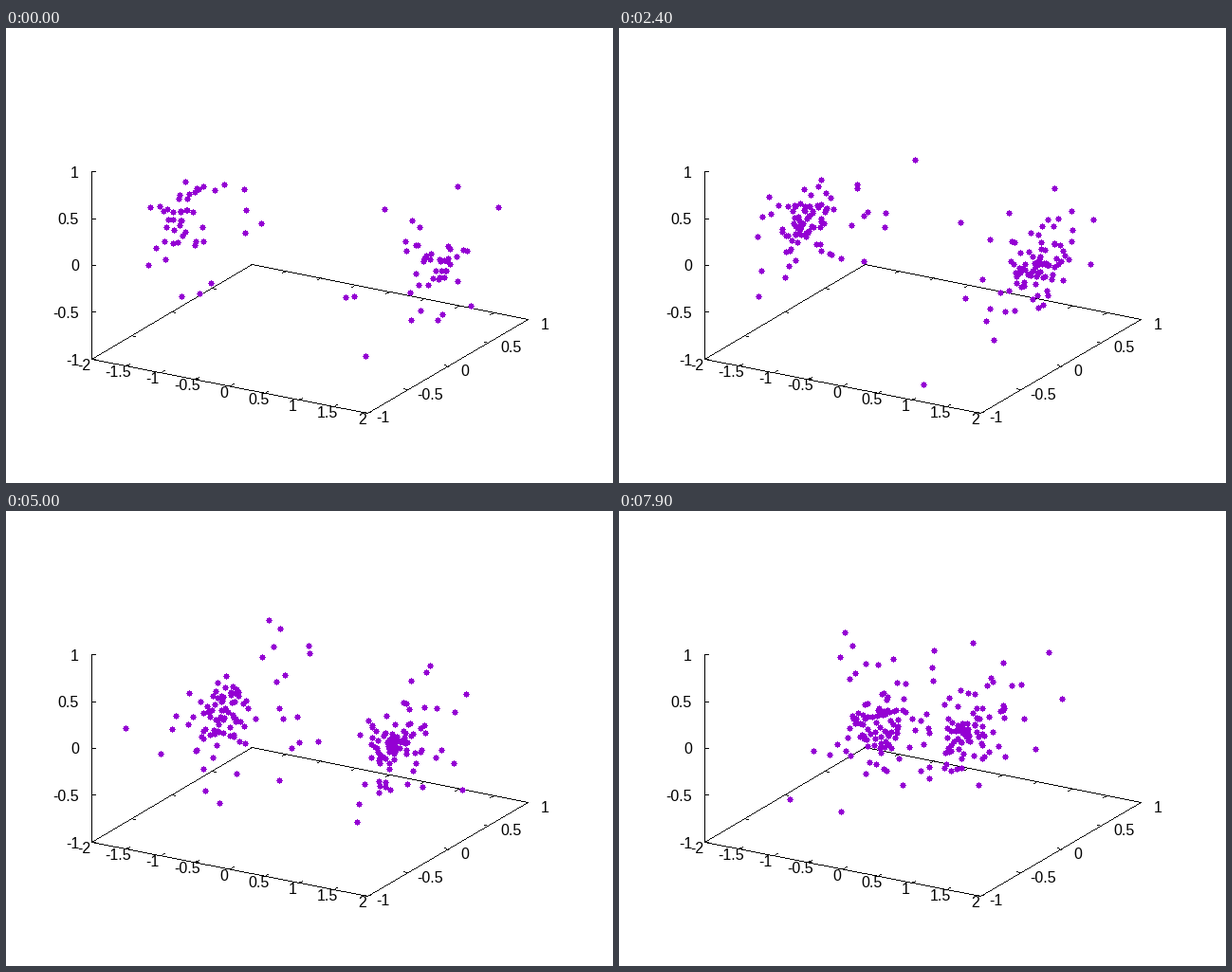
Recreate the animation shown at these times as a matplotlib script. Size 640x480 px, loop 8000 ms.

```python
import numpy as np
import matplotlib.pyplot as plt
from matplotlib.animation import FuncAnimation

W, H, DPI = 640, 480, 80
FRAMES, STEP = 80, 0.1      # 80 frames of 100 ms
PX = 72 / DPI               # one pixel in points
VIOLET = "#9400d3"
GM, SOFT, COUNT = 0.144, 0.24, 100


def project(p):
    """Box coordinates to stage pixels."""
    x, y, z = p.T
    return np.stack([320 + 72.7 * x + 84.5 * y,
                     229 + 14.4 * x - 49.7 * y - 99 * z], -1)


# --- two star clusters falling towards each other ---
def core(t):
    """Place of the right-hand core; the left one is its mirror image."""
    return np.array([2 - 0.12 * t - 0.008 * t * t, 0.012 * t, 0.0])


def pull(pos, t):
    acc = np.zeros_like(pos)
    for side in (-1, 1):
        d = side * core(t) - pos
        r2 = (d * d).sum(1, keepdims=True) + SOFT ** 2
        acc += GM * d / r2 ** 1.5
    return acc


def cluster(rng, side):
    """Stars of a Plummer sphere in balance, moving along with its core."""
    u = rng.uniform(0.01, 0.95, (COUNT, 1))
    r = SOFT / np.sqrt(u ** (-2 / 3) - 1)
    way = rng.normal(size=(COUNT, 3))
    way /= np.linalg.norm(way, axis=1, keepdims=True)
    sigma = np.sqrt(GM / (6 * np.sqrt(r * r + SOFT ** 2)))
    drift = np.array([-0.12, 0.012, 0])
    pos = side * core(0) + r * way
    vel = side * drift + sigma * rng.normal(size=(COUNT, 3))
    return np.hstack([pos, vel])


def simulate(sub=5):
    rng = np.random.default_rng(5)
    stars = np.vstack([cluster(rng, side) for side in (-1, 1)])
    pos, vel = stars[:, :3], stars[:, 3:]
    dt, track = STEP / sub, []
    for i in range(FRAMES):
        track.append(pos)
        for k in range(sub):
            t = i * STEP + k * dt
            vel = vel + pull(pos, t) * dt / 2
            pos = pos + vel * dt
            vel = vel + pull(pos, t + dt) * dt / 2
    return track


TRACK = simulate()

# Pixels of a disc with radius 3
grid = np.mgrid[-3:4, -3:4].reshape(2, -1).T
DISC = grid[(grid ** 2).sum(1) <= 9]


def dots(i):
    p = TRACK[i]
    inside = (np.abs(p) <= [2, 1, 1]).all(1)
    xy = np.rint(project(p[inside]))
    return (xy[:, None] + DISC).reshape(-1, 2)


# --- stage ---
fig = plt.figure(figsize=(W / DPI, H / DPI), dpi=DPI, facecolor="white")
ax = fig.add_axes([0, 0, 1, 1])
ax.set(xlim=(0, W), ylim=(H, 0))
ax.axis("off")


def pixels(x, y, color):
    return ax.plot(x, y, ls="none", marker=",", color=color,
                   antialiased=False)[0]


def line(a, b):
    """Hard one-pixel line."""
    a, b = np.rint(a), np.rint(b)
    n = int(np.abs(b - a).max()) + 1
    x, y = np.rint(np.linspace(a, b, n)).T
    pixels(x, y, "black")


def label(x, y, value, ha):
    ax.text(x, y, f"{value:g}", ha=ha, va="baseline", color="black",
            family="Liberation Sans", size=16 * PX)


A, B, C, D = map(np.array, [(90, 350), (381, 407), (550, 308), (259, 250)])
for a, b in [(A, B), (B, C), (C, D), (D, A), (A, (90, 152))]:
    line(a, b)

for i, v in enumerate(np.linspace(-2, 2, 9)):
    front, back = A + (B - A) * i / 8, D + (C - D) * i / 8
    line(front, front + (4, -2))
    line(back, back + (-4, 2))
    label(82 + 36.4 * i + 2.2 * (v >= 0), 361 + 7.15 * i, v, "center")

for i, v in enumerate(np.linspace(-1, 1, 5)):
    left, right = A + (D - A) * i / 4, B + (C - B) * i / 4
    line(left, left + (4, 1))
    line(right, right + (-4, -1))
    label(390.5 + 42.25 * i + 4 * (v >= 0), 416.5 - 24.75 * i, v, "left")
    z = 350 - 49.5 * i
    line((90, z), (94, z))
    label(77, z + 5.5, v, "right")

stars = pixels([], [], VIOLET)


def draw(i):
    stars.set_data(*dots(i).T)
    return stars,


anim = FuncAnimation(fig, draw, frames=FRAMES, interval=100,
                     repeat=True, repeat_delay=0, blit=False)
plt.show()
```
